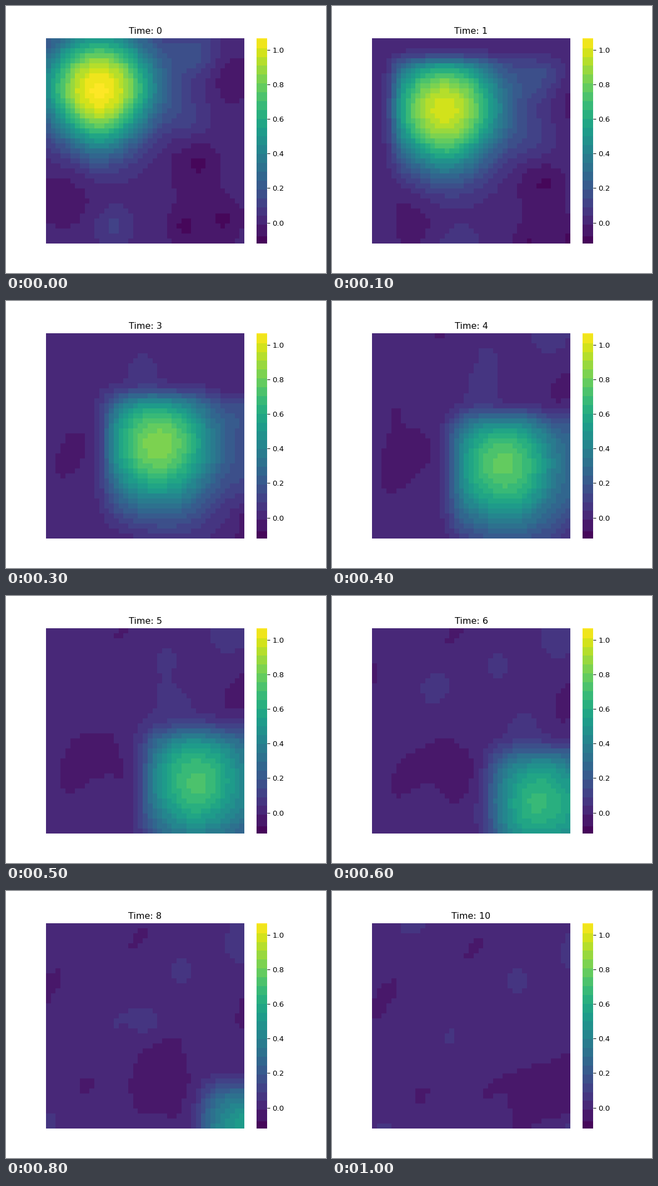
Animation, 576 px wide and 480 px high, one loop 1.1 s. Source, as a matplotlib script:

```python
import numpy as np
import matplotlib.pyplot as plt
from matplotlib.animation import FuncAnimation
from matplotlib.colors import ListedColormap

N, STEPS, SPEED = 41, 11, 4
VMIN, VMAX = -0.1211, 1.0689
BASE = 0.012

col, row = np.meshgrid(np.arange(N) + 0.5, np.arange(N) + 0.5)
rng = np.random.default_rng(7)
waves = rng.normal(0, 0.3, (12, 2))
phases = rng.uniform(0, 2 * np.pi, 12)

# Uneven medium at the start: column, row, radius, height.
MEDIUM = [
    (30.5, 3, 5, 0.14), (29.5, 16, 4.5, 0.08), (14, 37.5, 4, 0.09),
    (38, 8, 5, -0.06), (30, 24.5, 5, -0.06), (32, 25, 2.5, -0.06),
    (4, 31, 7, -0.055), (33, 37, 7, -0.055), (28.5, 37.5, 2.5, -0.07),
    (37, 36, 2.5, -0.07),
]


def bump(x, y, rx, ry):
    return np.exp(-0.9 * (((col - x) / rx) ** 2 + ((row - y) / ry) ** 2))


def medium(t):
    s = SPEED * t
    return 0.93 ** t * sum(h * bump(x + s, y + s, r, r) for x, y, r, h in MEDIUM)


def pulse(t):
    """Flat-topped hill with a pointed lower side that rounds off."""
    dx = np.abs(col - 11 - SPEED * t)
    dy = row - 10.4 - SPEED * t
    q = np.where(dy > 0, min(2, 1.6 + 0.1 * t), 2)
    d = (dx ** q + np.abs(dy) ** q) ** (1 / q)
    radius = np.sqrt(132 + 9 * t)
    return 1.06 * np.exp(-0.08 * t - (d / radius) ** max(2, 2.35 - 0.06 * t))


def inflow(t):
    """Clean medium entering from the top and the left."""
    if t == 0:
        return 1
    w = min(0.7 + 0.13 * t, 1.4)
    edge = SPEED * t
    return 1 / ((1 + np.exp((edge - col) / w)) * (1 + np.exp((edge - row) / w)))


def wake(t):
    """Shallow trough and two crests trailing the pulse, over faint ripples."""
    u = t - 4
    grow = np.clip((t - 1) / 3, 0, 1)
    trough = bump(9 + 1.5 * u + 0.5 * u * u, 14 + 2 * t, 6, 8)
    z = -0.055 * grow * trough
    for start, x, y in ((5, 27, 15), (7, 16.5, 15.5)):
        s = SPEED * (t - start)
        z += 0.085 * max(0, 1 - abs(t - start) / 3) * bump(x + s, y + s, 3, 3)
    for (kx, ky), p in zip(waves, phases):
        z += 0.006 * grow * np.cos(kx * (col - t) + ky * (row - t) + p)
    return z


def field(t):
    return BASE + inflow(t) * (pulse(t) + medium(t)) + wake(t)


def banded_viridis(size=512):
    edges = np.r_[VMIN, -0.08, np.arange(-0.0124, VMAX, 0.0512), VMAX]
    mids = (edges[1:] + edges[:-1]) / 2
    values = np.linspace(VMIN, VMAX, size)
    band = np.digitize(values, edges[1:-1])
    return ListedColormap(plt.get_cmap("viridis")((mids[band] - VMIN) / (VMAX - VMIN)))


plt.rcParams["font.family"] = "DejaVu Sans"
fig, ax = plt.subplots(figsize=(6, 5), dpi=96)
mesh = ax.pcolormesh(field(0), cmap=banded_viridis(), vmin=VMIN, vmax=VMAX)
ax.invert_yaxis()
ax.set_axis_off()
bar = fig.colorbar(mesh, ax=ax, ticks=np.arange(0, 1.1, 0.2))
bar.outline.set_visible(False)
title = ax.set_title("Time: 0")


def update(t):
    mesh.set_array(field(t))
    title.set_text(f"Time: {t}")
    return mesh, title


anim = FuncAnimation(fig, update, frames=STEPS, interval=100, repeat=True)
plt.show()
```
